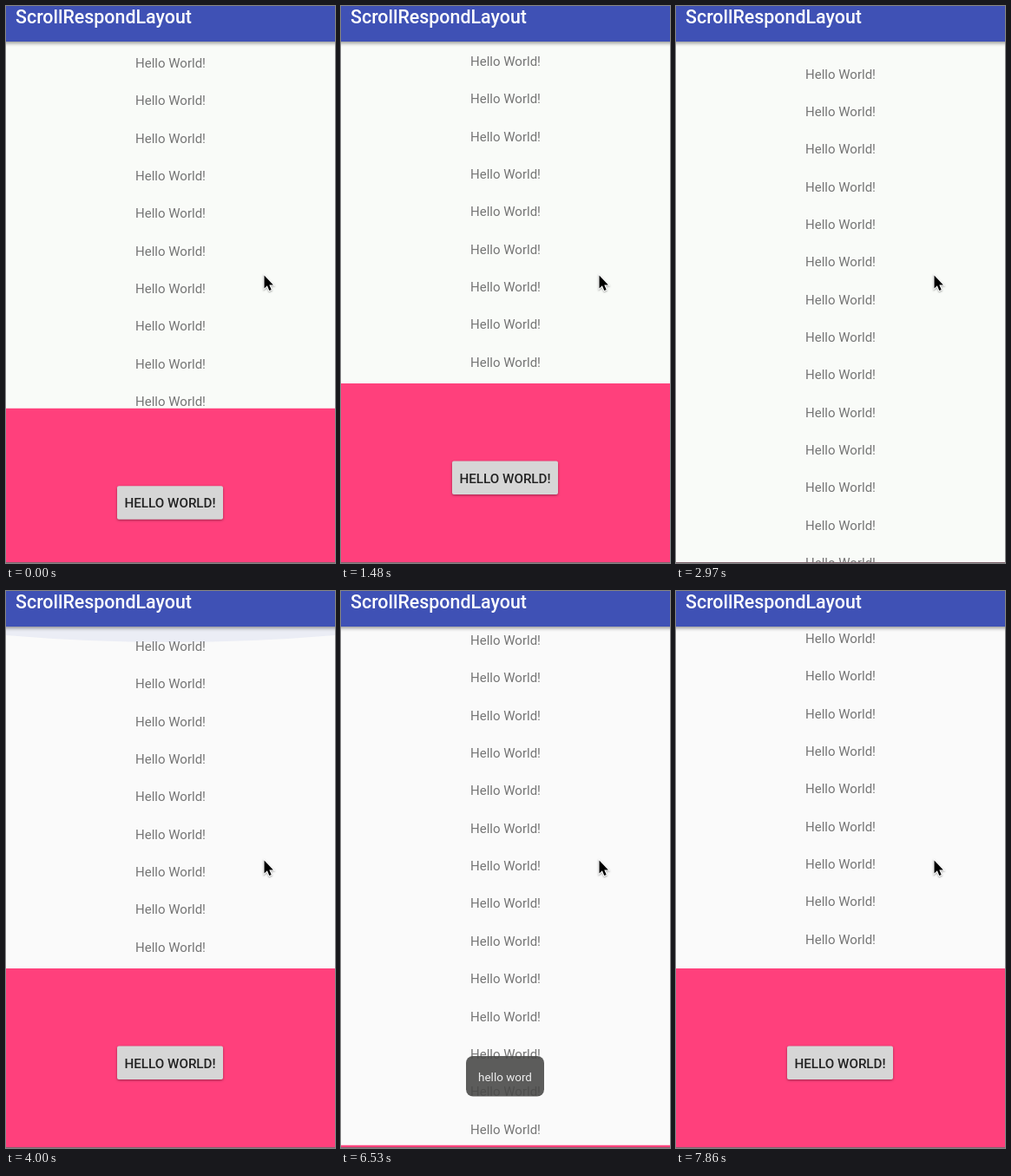
Animation, 379 px wide and 642 px high, one loop 8000 ms. Source, as an HTML page with a canvas:

```html
<!DOCTYPE html>
<html lang="en">
<head>
<meta charset="utf-8">
<title>Scroll responding layout</title>
<style>
  html, body { margin: 0; height: 100%; overflow: hidden; }
  canvas { display: block; width: 379px; height: 642px; }
</style>
</head>
<body>
<canvas id="stage"></canvas>
<script>
const W = 379, H = 642, LOOP = 8000, TICK = 148;
const BAR = 41, ROW = 43.35, PANEL_TOP = 435, PANEL_HEIGHT = 207;

const canvas = document.getElementById('stage');
const ctx = canvas.getContext('2d');
const ratio = window.devicePixelRatio || 1;
canvas.width = W * ratio;
canvas.height = H * ratio;
ctx.scale(ratio, ratio);

// Tracks are [tick, value] pairs; the screen updates once per tick.
const SCROLL = [
  [0, 84.7], [1, 140], [2, 180], [3, 195], [6, 195], [7, 165], [8, 95], [9, 30], [10, 0],
  [13, 0], [14, 30], [16, 120], [18, 182], [20, 202.2],
  [21, 202.2], [22, 165], [23, 110], [24, 50], [25, 0],
  [39, 0], [40, 33.8], [42, 125], [44, 180.4], [45, 187],
  [47, 187], [48, 160], [50, 80], [52, 20], [53, 9]
];
const GLOW = [[24, 0], [25, 0.5], [26, 1], [39, 1], [40, 0]];
const PRESS = [[33, 0], [34, 1], [35, 0.6], [36, 0]];
const TOAST = [[34, 0], [35, 0.25], [36, 0.75], [37, 1], [48, 1], [49, 0.8], [50, 0.3], [51, 0]];

// Panel slides: [start tick, hidden afterwards].
const SLIDES = [[-0.9, 1], [6.2, 0], [14.6, 1], [22.5, 0], [40.6, 1], [48.6, 0]];
const SLIDE_TICKS = 3.7;

function valueAt(track, tick) {
  const next = track.findIndex(([time]) => time > tick);
  if (next === 0) return track[0][1];
  if (next < 0) return track[track.length - 1][1];
  const [t0, v0] = track[next - 1], [t1, v1] = track[next];
  return v0 + (v1 - v0) * (tick - t0) / (t1 - t0);
}

function hiddenPart(tick) {
  const [start, hide] = SLIDES.filter(slide => slide[0] <= tick).pop();
  const progress = Math.min(1, (tick - start) / SLIDE_TICKS);
  const eased = (1 - Math.cos(Math.PI * progress)) / 2;
  return hide ? eased : 1 - eased;
}

function shadow(color, blur, y) {
  ctx.shadowColor = color;
  ctx.shadowBlur = blur * ratio;
  ctx.shadowOffsetY = y * ratio;
}

function box(x, y, w, h, radius, color) {
  ctx.fillStyle = color;
  ctx.beginPath();
  ctx.roundRect(x, y, w, h, radius);
  ctx.fill();
}

function text(string, x, y, weight, size, color, align = 'center') {
  ctx.font = `${weight} ${size}px Roboto, sans-serif`;
  ctx.fillStyle = color;
  ctx.textAlign = align;
  ctx.fillText(string, x, y);
}

function drawList(scroll) {
  const first = Math.floor(scroll / ROW);
  for (let i = first; i < first + 16; i++) {
    text('Hello World!', 189.5, 69 + i * ROW - scroll, 400, 15, '#757575');
  }
}

function drawGlow(strength) {
  if (!strength) return;
  ctx.fillStyle = `rgba(63,81,181,${0.075 * strength})`;
  ctx.beginPath();
  ctx.moveTo(0, BAR);
  ctx.lineTo(0, BAR + 10 * strength);
  ctx.quadraticCurveTo(W / 2, BAR + 26 * strength, W, BAR + 10 * strength);
  ctx.lineTo(W, BAR);
  ctx.fill();
}

function drawPanel(top, press) {
  box(0, top, W, PANEL_HEIGHT + 1, 0, '#ff407c');
  ctx.save();
  shadow('rgba(0,0,0,.4)', 3 + 4 * press, 1 + 2 * press);
  const shade = 214 - 20 * press;
  box(128, top + 89.5, 122, 38.5, 2, `rgb(${shade},${shade},${shade})`);
  ctx.restore();
  text('HELLO WORLD!', 189, top + 114.5, 500, 15.2, '#222');
}

function drawToast(alpha) {
  if (!alpha) return;
  ctx.save();
  ctx.globalAlpha = alpha;
  ctx.translate(0, 16 * (1 - alpha));
  box(144, 536, 90, 46.5, 8, 'rgba(73,74,72,.89)');
  text('hello word', 189, 565, 400, 13.45, '#eee');
  ctx.restore();
}

function drawBar() {
  ctx.save();
  shadow('rgba(0,0,0,.4)', 4, 1.5);
  box(-10, -10, W + 20, BAR + 10, 0, '#3f51b5');
  ctx.restore();
  text('ScrollRespondLayout', 11, 20, 500, 21.4, '#fff', 'left');
}

function drawCursor() {
  ctx.save();
  const arrow = new Path2D('M297.5 310.5v15l3.4-3.2 2.4 5.6 2.4-1-2.4-5.5h4.6z');
  shadow('rgba(0,0,0,.35)', 2, 1);
  ctx.strokeStyle = '#fff';
  ctx.lineWidth = 2;
  ctx.stroke(arrow);
  ctx.shadowColor = 'transparent';
  ctx.fillStyle = '#000';
  ctx.fill(arrow);
  ctx.restore();
}

function draw(now) {
  const tick = Math.floor(now % LOOP / TICK);
  box(0, 0, W, H, 0, tick < 22 ? '#f9fbf8' : '#fafafa');
  drawList(valueAt(SCROLL, tick));
  drawGlow(valueAt(GLOW, tick));
  drawPanel(PANEL_TOP + PANEL_HEIGHT * hiddenPart(tick), valueAt(PRESS, tick));
  drawToast(valueAt(TOAST, tick));
  drawBar();
  box(0, H - 1, W, 1, 0, '#80666e');
  drawCursor();
}

const start = performance.now();
function frame() {
  draw(performance.now() - start);
  requestAnimationFrame(frame);
}
frame();
</script>
</body>
</html>
```
